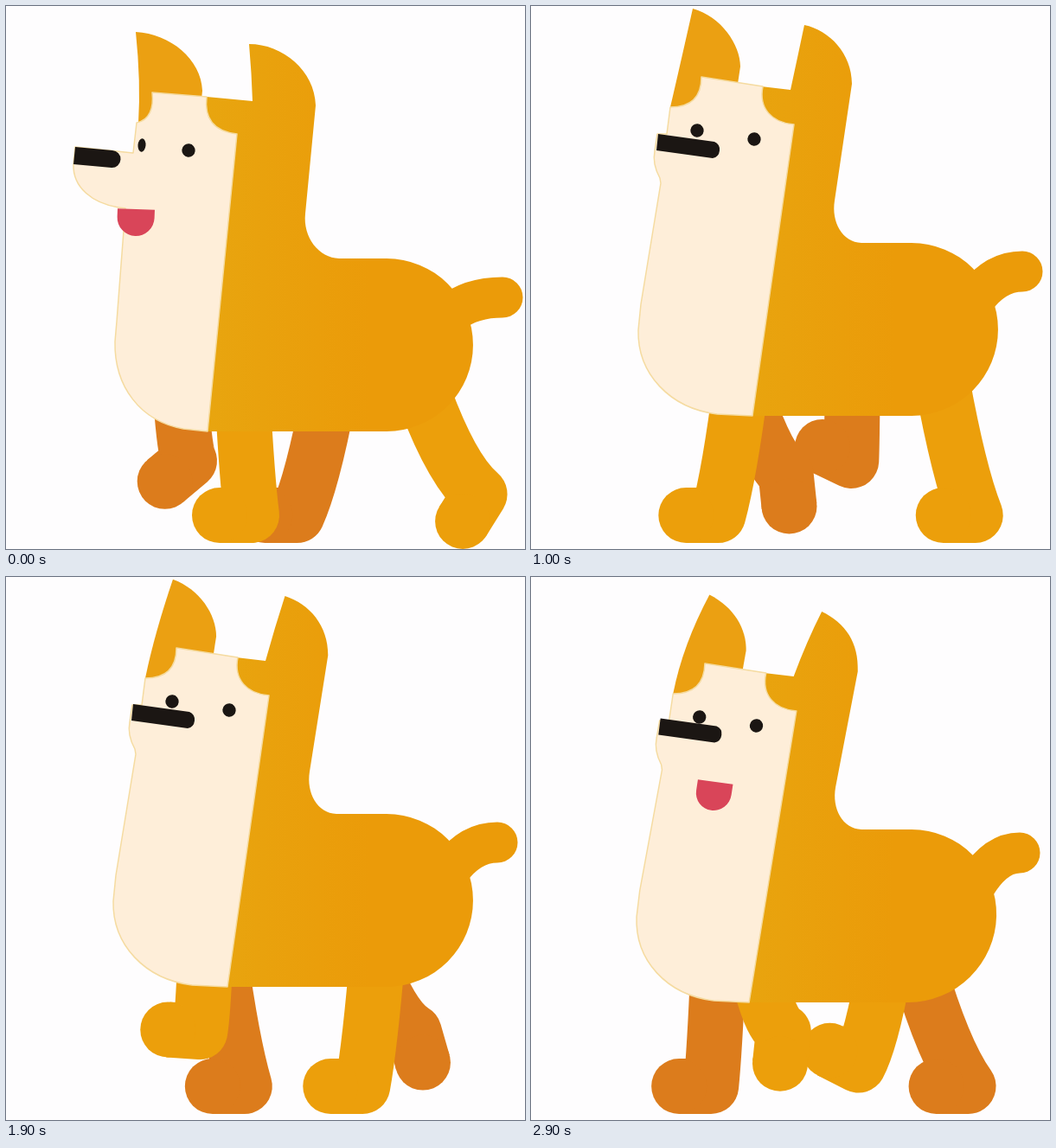
Animation, 600 px wide and 628 px high, one loop 3 s. Source, as an HTML page with a canvas:

```html
<!DOCTYPE html>
<html lang="en">
<head>
<meta charset="utf-8">
<title>Walking dog</title>
<style>
html, body { margin: 0; width: 100%; height: 100%; overflow: hidden; background: #fefdfe; }
canvas { display: block; }
</style>
</head>
<body>
<canvas id="stage" width="600" height="628"></canvas>
<script>
const c = document.getElementById('stage').getContext('2d');
const LOOP = 3000, STEP = 100, STRIDE = 1200;
const FAR = '#dc7c1c', NEAR = '#ec9f0b', COAT = '#eb9b09', CREAM = '#feeed9', INK = '#1b1613', TONGUE = '#d94559';

const lerp = (a, b, k) => a + (b - a) * k;

// Smooth step from 0 at time a to 1 at time b
function ramp(t, a, b) {
  const k = Math.min(1, Math.max(0, (t - a) / (b - a)));
  return k * k * (3 - 2 * k);
}

// Blend two SVG paths that share the same commands
function blend(a, b, k) {
  const to = b.match(/[\d.]+/g);
  let i = 0;
  return a.replace(/[\d.]+/g, v => +lerp(+v, +to[i++], k).toFixed(2));
}

// Outlines: side view, turned to the viewer, turned with ears swung back
const RUMP = 'L440,274A100 100 0 0 1 440,474';
const BODY = [
  `M281,26C320,26 357,57 358,97L346,222C343,250 362,273 385,274${RUMP}L232,474L225,200L232,87L285,92Q284,60 281,26Z`,
  `M316,22C345,28 371,55 371,90L351,225C347,250 360,273 382,274${RUMP}L255,474L250,200L266,93L300,97Q308,60 316,22Z`,
  `M341,22C368,40 377,60 376,92L351,225C347,250 360,273 382,274${RUMP}L255,474L250,200L266,93L300,97Q318,55 341,22Z`
];
const EAR = [
  'M150,12C190,14 226,44 227,80L226,90L190,125L153,118Q156,70 150,12Z',
  'M187,3C220,12 242,45 242,70L239,90L190,125L161,117Q172,70 187,3Z',
  'M210,2C236,20 246,40 246,65L242,90L190,125L161,117Q170,55 210,2Z'
];
const FACE = [
  'M169,82L232,87C229,112 240,127 267,130L233,474L205,471C155,462 125,422 126,370L128,347L138,216L130,215C100,210 77,192 78,165L80,145L147,152L151,117C166,114 171,100 169,82Z',
  'M197,82L268,93C263,118 278,135 304,137L256,474L215,472C160,465 123,425 124,375L127,345L150,205L149,199C143,188 141,178 143,168L146,148L157,148L161,117C185,117 197,105 197,82Z'
];
const NOSE = [
  'M80,145L123,149A10 10 0 0 1 122,169L78,165Z',
  'M147,148L212,157A10 10 0 0 1 210,176L145,167Z'
];

// Middle of the step, time of lift-off, and how fast the foot is pulled forward
const FRONT = { center: 284, liftOff: 300, pull: 30 };
const HIND = { center: 463, liftOff: 1150, pull: 0 };

function fill(path, color) {
  c.fillStyle = color;
  c.fill(new Path2D(path));
}

function oval(x, y, rx, ry, tilt, color) {
  c.beginPath();
  c.ellipse(x, y, rx, ry, tilt, 0, 2 * Math.PI);
  c.fillStyle = color;
  c.fill();
}

// Half the stride the foot swings forward, half it slides back on the ground
function leg({ center, liftOff, pull }, t, drop, color) {
  const phase = (t - liftOff + STRIDE) % STRIDE / (STRIDE / 2);
  const swing = phase < 1 ? Math.sin(Math.PI * phase) : 0;
  const lift = Math.min(1, 1.5 * swing);
  const pitch = lift * (3 - 4.6 * phase);
  const heelX = center + 203 * (Math.abs(phase - 1) - .5) - pull * swing;
  const heelY = 589 - 63 * lift;
  const hip = lerp(center - 19, heelX, .45) - 16 * lift;
  const toeX = heelX - 37 * Math.cos(pitch), toeY = heelY + 37 * Math.sin(pitch);

  c.beginPath();
  c.moveTo(hip, 435 + drop);
  c.quadraticCurveTo((hip + heelX) / 2, 540 - 30 * lift + drop / 2, heelX, heelY);
  c.lineTo(toeX, toeY);
  c.lineWidth = 64;
  c.lineCap = 'butt';
  c.lineJoin = 'round';
  c.strokeStyle = color;
  c.stroke();
  oval(toeX, toeY, 32, 32, 0, color);
}

function burst(t) {
  const k = (t - 2000) / 400;
  if (k < 0 || k > 1) return;
  const r = 75 + 55 * k * (2 - k);
  for (const deg of [56, 22, -3, -20, -53]) {
    c.save();
    c.translate(150, 215);
    c.rotate(deg * Math.PI / 180);
    c.beginPath();
    c.roundRect(-r - 13, -7, 26, 14, 6);
    c.fillStyle = '#fff8ea';
    c.fill();
    c.lineWidth = 1.5;
    c.strokeStyle = '#ead7ac';
    c.stroke();
    c.restore();
  }
}

function tail(raise) {
  const x = 574 - 6 * raise, y = 319 - 12 * raise;
  c.beginPath();
  c.moveTo(514, 338);
  c.quadraticCurveTo(537, y, x, y);
  c.lineWidth = 47;
  c.lineCap = 'round';
  c.strokeStyle = COAT;
  c.stroke();
}

function mouth(x, y, width, depth, tilt) {
  c.save();
  c.translate(x, y);
  c.rotate(tilt);
  c.beginPath();
  c.roundRect(-width / 2, 0, width, depth, [0, 0, width / 2, width / 2]);
  c.fillStyle = TONGUE;
  c.fill();
  c.restore();
}

const coat = c.createLinearGradient(235, 0, 420, 0);
coat.addColorStop(0, '#e8a50f');
coat.addColorStop(1, COAT);

function draw(t) {
  const tilt = ramp(t, 200, 700), turn = ramp(t, 300, 850), rise = ramp(t, 300, 700);
  const settle = ramp(t, 2400, 2900), smile = ramp(t, 2100, 2600);
  const earSwing = ramp(t, 1800, 2100) - .4 * ramp(t, 2400, 2800);
  const drop = 18 + 6 * ramp(t, 0, 300) - 24 * rise + 18 * settle;
  const lean = .02 * settle;
  const pose = set => earSwing ? blend(set[1], set[2], earSwing) : blend(set[0], set[1], tilt);

  c.fillStyle = '#fefdfe';
  c.fillRect(0, 0, 600, 628);
  burst(t);
  c.save();
  c.translate(-42, 0);
  for (const kind of [HIND, FRONT]) leg(kind, t + STRIDE / 2, drop, FAR);
  c.restore();
  for (const kind of [HIND, FRONT]) leg(kind, t, drop, NEAR);

  c.save();
  c.translate(0, drop);
  tail(rise + settle / 2);
  c.transform(1, 0, -lean, 1, 280 * lean, 0);
  fill(pose(EAR), '#eba012');
  fill(pose(BODY), coat);
  const face = blend(FACE[0], FACE[1], turn);
  fill(face, CREAM);
  c.lineWidth = 1.5;
  c.strokeStyle = '#f5dba0';
  c.stroke(new Path2D(face));

  const blink = t > 500 && t < 900 ? Math.sin(Math.PI * (t - 500) / 400) : 0;
  const eye = 7.7 * (1 - .8 * blink);
  oval(lerp(157, 192, turn), lerp(143, 144, turn), lerp(4.5, 7.7, turn), eye, .1, INK);
  oval(lerp(211, 258, turn), lerp(149, 154, turn), 7.7, eye, .1, INK);

  if (turn < 1) mouth(lerp(150.5, 205, turn), lerp(217, 219, turn), 43 * Math.cbrt(1 - turn), 31 * (1 - turn), lerp(.04, .13, turn));
  if (smile) mouth(228 - 16 * smile, 219, 58 - 17 * smile, 33 * smile, .13);

  c.translate(0, -4 * earSwing);
  fill(blend(NOSE[0], NOSE[1], turn), INK);
  c.restore();
}

function tick() {
  draw(Math.floor(performance.now() % LOOP / STEP) * STEP);
  requestAnimationFrame(tick);
}
tick();
</script>
</body>
</html>
```
